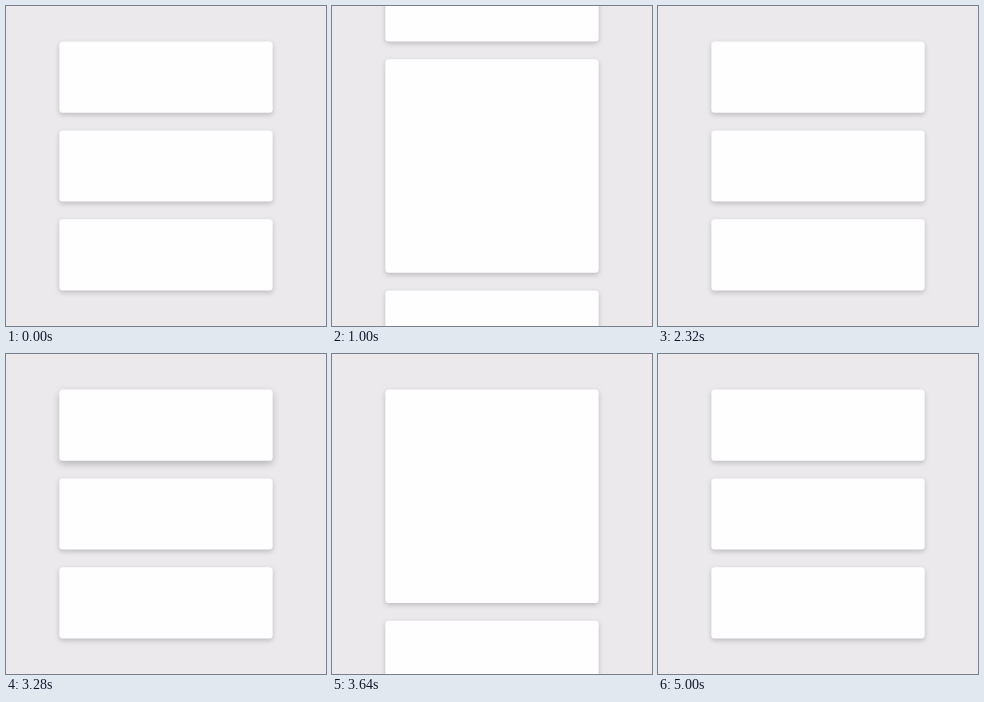
Write an HTML page that moves like this. It is 320x320 px and loops after 5360 ms.

```html
<!DOCTYPE html>
<html lang="en">
<head>
<meta charset="utf-8">
<title>Expanding cards</title>
<style>
  @property --open  { syntax: "<number>"; inherits: true; initial-value: 0; }
  @property --lift  { syntax: "<number>"; inherits: true; initial-value: 0; }
  @property --first { syntax: "<number>"; inherits: true; initial-value: 0; }

  html, body { margin: 0; width: 100%; height: 100%; overflow: hidden; background: #ebe9ec; }

  svg {
    --u: 17.7778px; /* one layout unit, 1/18 of the stage */
    display: block;
    width: 100%;
    height: 100%;
    animation:
      open 2680ms linear infinite,
      lift 2680ms linear infinite,
      pick 5360ms step-end infinite;
  }

  rect {
    --grow: 0;
    --up: calc(var(--lift) * var(--grow));
    x: calc(3 * var(--u));
    y: calc(var(--u) * var(--top));
    width: calc(12 * var(--u));
    height: calc(var(--u) * (4 + 8 * var(--open) * var(--grow)));
    rx: 3.5px;
    fill: #fefdff;
    filter: drop-shadow(0 calc(2px + 2px * var(--up)) calc(2.5px + 1.5px * var(--up))
      rgb(0 0 0 / calc(.2 + .04 * var(--up))));
  }
  .a { --grow: var(--first);           --top: calc(2 - 4 * var(--open) * (1 - var(--first))); }
  .b { --grow: calc(1 - var(--first)); --top: calc(7 + var(--open) * (12 * var(--first) - 4)); }
  .b { --top: calc(7 + var(--open) * (8 * var(--first) - 4 * (1 - var(--first)))); }
  .c { --top: calc(12 + var(--open) * (4 + 4 * var(--first))); }

  @keyframes open {
    0%, 23.43%     { --open: 0; animation-timing-function: cubic-bezier(.4, 0, .4, 1); }
    35.37%         { --open: 1; }
    74.07%         { --open: 1; animation-timing-function: cubic-bezier(.4, 0, .4, 1); }
    85.45%, 100%   { --open: 0; }
  }
  @keyframes lift {
    0%, 18.84%     { --lift: 0; }
    23.32%, 31.34% { --lift: 1; }
    36.2%, 100%    { --lift: 0; }
  }
  /* the middle card opens first, then the top one */
  @keyframes pick {
    0%  { --first: 0; }
    50%, 100% { --first: 1; }
  }
</style>
</head>
<body>
<svg viewBox="0 0 320 320">
  <rect class="a"/>
  <rect class="b"/>
  <rect class="c"/>
</svg>
</body>
</html>
```
